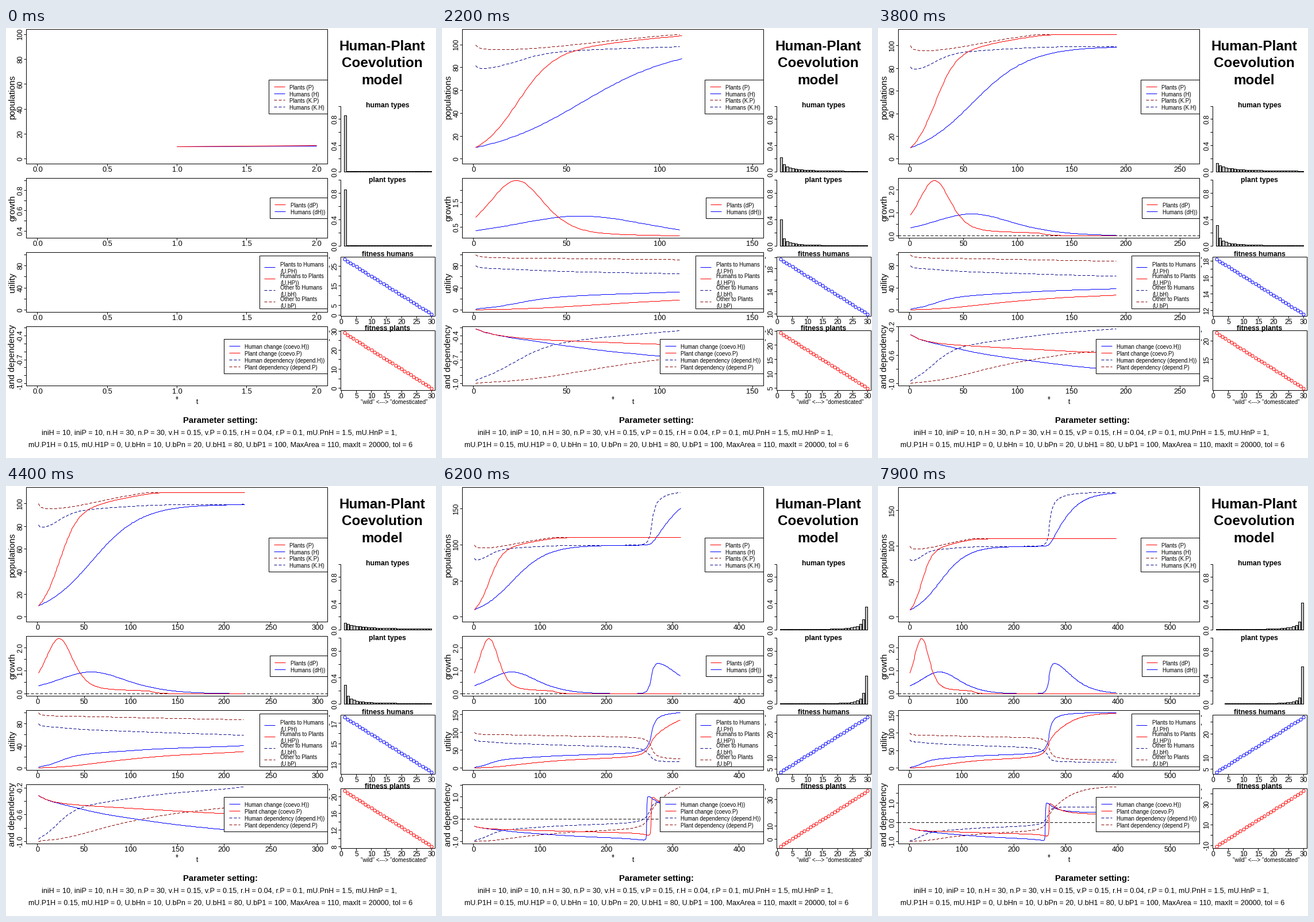
Animation of 748x748 px, one loop 8 s. Source, as a matplotlib script:

```python
import math

import numpy as np
import matplotlib.pyplot as plt
from matplotlib.animation import FuncAnimation
from matplotlib.collections import LineCollection, PolyCollection
from matplotlib.patches import Rectangle

SIZE, DPI = 748, 100
PX = 72 / DPI
FRAMES, STEP = 80, 5
N = 30
RED, BLUE, DARKRED, DARKBLUE = "#ff0000", "#0000ff", "#8b0000", "#00008b"
DASH = (0, (5, 3))

plt.rcParams["font.family"] = "Liberation Sans"
plt.rcParams["path.snap"] = False  # whole coordinates already hit pixel centres


# ---- model -------------------------------------------------------------

def vary(types, v=0.15):
    return (1 - v) * types + v / N


def select(types, fit):
    return types * fit / (types @ fit)


def simulate(steps, area=110):
    i = np.arange(1, N + 1)
    ramp = lambda first, last: np.linspace(first, last, N)
    th = (i == 1).astype(float)
    tp = th.copy()
    H = P = 10.0
    log = {k: [] for k in ("H P KH KP dH dP UPH UHP UbH UbP cH cP depH depP "
                           "fitH fitP typH typP").split()}
    for _ in range(steps):
        uph = P * (tp @ ramp(0.15, 1.5))
        uhp = H * (th @ ramp(0, 1))
        ubh = th @ ramp(80, 10)
        ubp = tp @ ramp(100, 20)
        kh = uph + ubh
        kp = min(uhp + ubp, area)
        fh = (i * uph + (N - i) * (kh - uph)) / kh
        fp = (i * uhp + (N - i) * (kp - uhp)) / kp
        dh = 0.04 * H * (1 - H / kh)
        dp = 0.1 * P * (1 - P / kp)
        vh, vp = vary(th), vary(tp)
        row = dict(H=H, P=P, KH=kh, KP=kp, dH=dh, dP=dp,
                   UPH=uph, UHP=uhp, UbH=ubh, UbP=ubp,
                   cH=np.corrcoef(i, vh)[0, 1], cP=np.corrcoef(i, vp)[0, 1],
                   depH=2 * uph / kh - 1, depP=2 * uhp / kp - 1,
                   fitH=fh, fitP=fp, typH=vh, typP=vp)
        for key, value in row.items():
            log[key].append(value)
        th, tp = select(vh, fh), select(vp, fp)
        H, P = H + dh, P + dp
    return {k: np.array(v) for k, v in log.items()}


sim = simulate(FRAMES * STEP + 2)

# ---- drawing helpers, all in pixel coordinates --------------------------

fig = plt.figure(figsize=(SIZE / DPI, SIZE / DPI), dpi=DPI, facecolor="white")
ax = fig.add_axes([0, 0, 1, 1])
ax.set_xlim(-0.5, SIZE - 0.5)
ax.set_ylim(SIZE - 0.5, -0.5)
ax.axis("off")

live = []


def text(x, y, s, size, rot=0, ha="center", bold=False):
    """Text whose capital letters are centred on (x, y) across the line."""
    drop = 0.36 * size
    x, y = (x + drop, y) if rot else (x, y + drop)
    live.append(ax.text(x, y, s, fontsize=size * PX, rotation=rot, ha=ha,
                        va="baseline", rotation_mode="anchor", zorder=5,
                        weight="bold" if bold else "normal"))


def line(x, y, color="black", style="-", z=2):
    x, y = np.rint(x), np.rint(y)
    live.extend(ax.plot(x, y, color=color, ls=style, lw=PX, zorder=z,
                        solid_capstyle="butt"))


def segments(segs):
    live.append(ax.add_collection(LineCollection(
        segs, colors="black", linewidths=PX, zorder=3)))


def box(x0, y0, x1, y1, fill="none", z=3):
    ax.add_patch(Rectangle((x0, y0), x1 - x0, y1 - y0, fc=fill, ec="black",
                           lw=PX, zorder=z))


def scale(lo, hi, a, b, pad=0.04):
    """Map lo..hi onto pixels a..b with padding on either end."""
    extra = pad * (hi - lo)
    lo, hi = lo - extra, hi + extra
    f = lambda v: a + (np.asarray(v) - lo) * (b - a) / (hi - lo)
    f.lo, f.hi = lo, hi
    return f


def pretty(lo, hi):
    cell = (hi - lo) / 5
    base = 10.0 ** math.floor(math.log10(cell))
    unit = base
    for mult, bias in ((2, 0.8), (5, 1.7), (10, 0.8)):
        if mult * base - cell < bias * (cell - unit):
            unit = mult * base
    first, last = math.ceil(lo / unit - 1e-7), math.floor(hi / unit + 1e-7)
    digits = max(0, -math.floor(math.log10(unit) + 1e-9))
    return [(k * unit, f"{k * unit:.{digits}f}") for k in range(first, last + 1)]


def label_width(s, size):
    return size * sum({".": 0.278, "-": 0.333}.get(c, 0.556) for c in s)


def axis(f, edge, side, size=12):
    """Ticks on a bottom or left edge; labels that would crowd are dropped."""
    segs, end = [], -1e9
    for value, s in pretty(f.lo, f.hi):
        p = float(f(value))
        r = round(p)
        pos = p if side == "bottom" else -p
        half = label_width(s, size) / 2
        if side == "bottom":
            segs.append([(r, edge), (r, edge + 4)])
        else:
            segs.append([(edge, r), (edge - 4, r)])
        if pos - half - end < 0.833 * size:
            continue
        end = pos + half
        if side == "bottom":
            text(p, edge + 9, s, size)
        else:
            text(edge - 11.5, p, s, size, rot=90)
    segments(segs)


def legend(x0, y0, y1, line_x, text_x, ys, entries):
    box(x0, y0, RIGHT, y1, "white", z=4)
    for y, (label, color, style) in zip(ys, entries):
        line([line_x, line_x + 19], [y, y], color, style, z=5)
        rows = label.split("\n")
        for k, row in enumerate(rows):
            text(text_x, y + 12 * k - 6 * (len(rows) - 1) + 1, row, 9.6, ha="left")


# ---- fixed parts ---------------------------------------------------------

LEFT, RIGHT = 35, 559
R_LEFT, R_RIGHT = 582, 746
POP, GROW, UTIL, DEP = (2, 236), (261, 365), (390, 494), (519, 622)
FIT_H, FIT_P = (398, 501), (526, 630)
BAR_H, BAR_P, BAR_LEN = 250, 379, 114.5

for (top, bottom), name in ((POP, "populations"), (GROW, "growth"),
                            (UTIL, "utility"), (DEP, "and dependency")):
    box(LEFT, top, RIGHT, bottom)
    text(9.6, (top + bottom) / 2 + (1 if top == 2 else 0), name, 15, rot=90)

legend(457, 90, 149, 466, 493, (102, 114, 125, 137), (
    ("Plants (P)", RED, "-"), ("Humans (H)", BLUE, "-"),
    ("Plants (K.P)", DARKRED, DASH), ("Humans (K.H)", DARKBLUE, DASH)))
legend(459, 295, 331, 467, 495, (307, 319), (
    ("Plants (dP)", RED, "-"), ("Humans (dH))", BLUE, "-")))
legend(441, 396, 488, 449, 477, (416, 436, 456, 476), (
    ("Plants to Humans\n(U.PH)", BLUE, "-"), ("Humans to Plants\n(U.HP))", RED, "-"),
    ("Other to Humans\n(U.bH)", DARKBLUE, DASH), ("Other to Plants\n(U.bP)", DARKRED, DASH)))
legend(379, 541, 601, 388, 415, (553, 565, 577, 589), (
    ("Human change (coevo.H))", BLUE, "-"), ("Plant change (coevo.P)", RED, "-"),
    ("Human dependency (depend.H))", DARKBLUE, DASH),
    ("Plant dependency (depend.P)", DARKRED, DASH)))

for k, row in enumerate(("Human-Plant", "Coevolution", "model")):
    text(653.5, 29.5 + 29.5 * k, row, 24.3, bold=True)
for y, name in ((133.5, "human types"), (263, "plant types"),
                (392.3, "fitness humans"), (521.6, "fitness plants")):
    text(663, y, name, 12.2, bold=True)

for base in (BAR_H, BAR_P):
    axis(scale(0, 1, base, base - BAR_LEN, pad=0), R_LEFT, "left")
    line([R_LEFT, R_LEFT], [base, base - BAR_LEN])

fit_x = scale(1, N, R_LEFT, R_RIGHT)
for top, bottom in (FIT_H, FIT_P):
    box(R_LEFT, top, R_RIGHT, bottom)
    axis(fit_x, bottom, "bottom")
    line([562, 562], [top, top + 3])
    line([562, 562], [top + 15, top + 18])

text(674.5, 650, '"wild" <---> "domesticated"', 9.9)
text(332, 649, "t", 12)
line([297, 297], [640, 646])
line([295, 299], [643, 643])

text(372.5, 681.4, "Parameter setting:", 14.9, bold=True)
text(370.5, 702.5, "iniH = 10, iniP = 10, n.H = 30, n.P = 30, v.H = 0.15, v.P = 0.15, "
     "r.H = 0.04, r.P = 0.1, mU.PnH = 1.5, mU.HnP = 1,", 12.5)
text(372.5, 724, "mU.P1H = 0.15, mU.H1P = 0, U.bHn = 10, U.bPn = 20, U.bH1 = 80, "
     "U.bP1 = 100, MaxArea = 110, maxIt = 20000, tol = 6", 12.5)

live.clear()

# ---- moving parts --------------------------------------------------------


def panel(span, fx, series, t, floor=None, zero=False):
    """One time plot; series are (key, colour, style, extra points)."""
    data = [sim[key][:t + more] for key, _, _, more in series]
    lo = min(d.min() for d in data) if floor is None else floor
    fy = scale(lo, max(d.max() for d in data), span[1], span[0])
    axis(fx, span[1], "bottom", 12.8)
    axis(fy, LEFT, "left")
    if zero and fy.lo < 0 < fy.hi:
        y = float(fy(0))
        line([LEFT, RIGHT], [y, y], "black", DASH)
    for d, (_, color, style, _) in zip(data, series):
        if len(d) > 1:
            line(fx(np.arange(1, len(d) + 1)), fy(d), color, style)


def bars(types, base):
    unit = (R_RIGHT - R_LEFT) / 1.08 / 35.8
    rects = []
    for k, share in enumerate(types):
        h = round(share * BAR_LEN)
        if h < 1:
            continue
        left = R_LEFT + 6.1 + 1.2 * unit * k
        x0, x1 = round(left), round(left + unit)
        rects.append([(x0, base), (x0, base - h), (x1, base - h), (x1, base)])
    live.append(ax.add_collection(PolyCollection(
        rects, facecolors="#bebebe", edgecolors="black", linewidths=PX, zorder=3)))


def fitness(fit, span, color):
    fy = scale(fit.min(), fit.max(), span[1], span[0])
    axis(fy, R_LEFT, "left")
    live.extend(ax.plot(fit_x(np.arange(1, N + 1)), fy(fit), "o", mfc="none",
                        mec=color, ms=5.2 * PX, mew=PX, zorder=4))


def update(frame):
    for artist in live:
        artist.remove()
    live.clear()
    t = 1 + STEP * frame
    fx = scale(0, math.ceil(1.35 * t), LEFT, RIGHT)
    panel(POP, fx, (("KP", DARKRED, DASH, 0), ("KH", DARKBLUE, DASH, 0),
                    ("H", BLUE, "-", 1), ("P", RED, "-", 1)), t, floor=0)
    panel(GROW, fx, (("dH", BLUE, "-", 0), ("dP", RED, "-", 0)), t, zero=True)
    panel(UTIL, fx, (("UbH", DARKBLUE, DASH, 0), ("UbP", DARKRED, DASH, 0),
                     ("UPH", BLUE, "-", 0), ("UHP", RED, "-", 0)), t, floor=0)
    panel(DEP, fx, (("depH", DARKBLUE, DASH, 0), ("depP", DARKRED, DASH, 0),
                    ("cH", BLUE, "-", 0), ("cP", RED, "-", 0)), t, zero=True)
    bars(sim["typH"][t - 1], BAR_H)
    bars(sim["typP"][t - 1], BAR_P)
    fitness(sim["fitH"][t - 1], FIT_H, BLUE)
    fitness(sim["fitP"][t - 1], FIT_P, RED)
    return live


anim = FuncAnimation(fig, update, frames=FRAMES, interval=100,
                     init_func=lambda: [], repeat=True, repeat_delay=0,
                     cache_frame_data=False)

plt.show()
```
